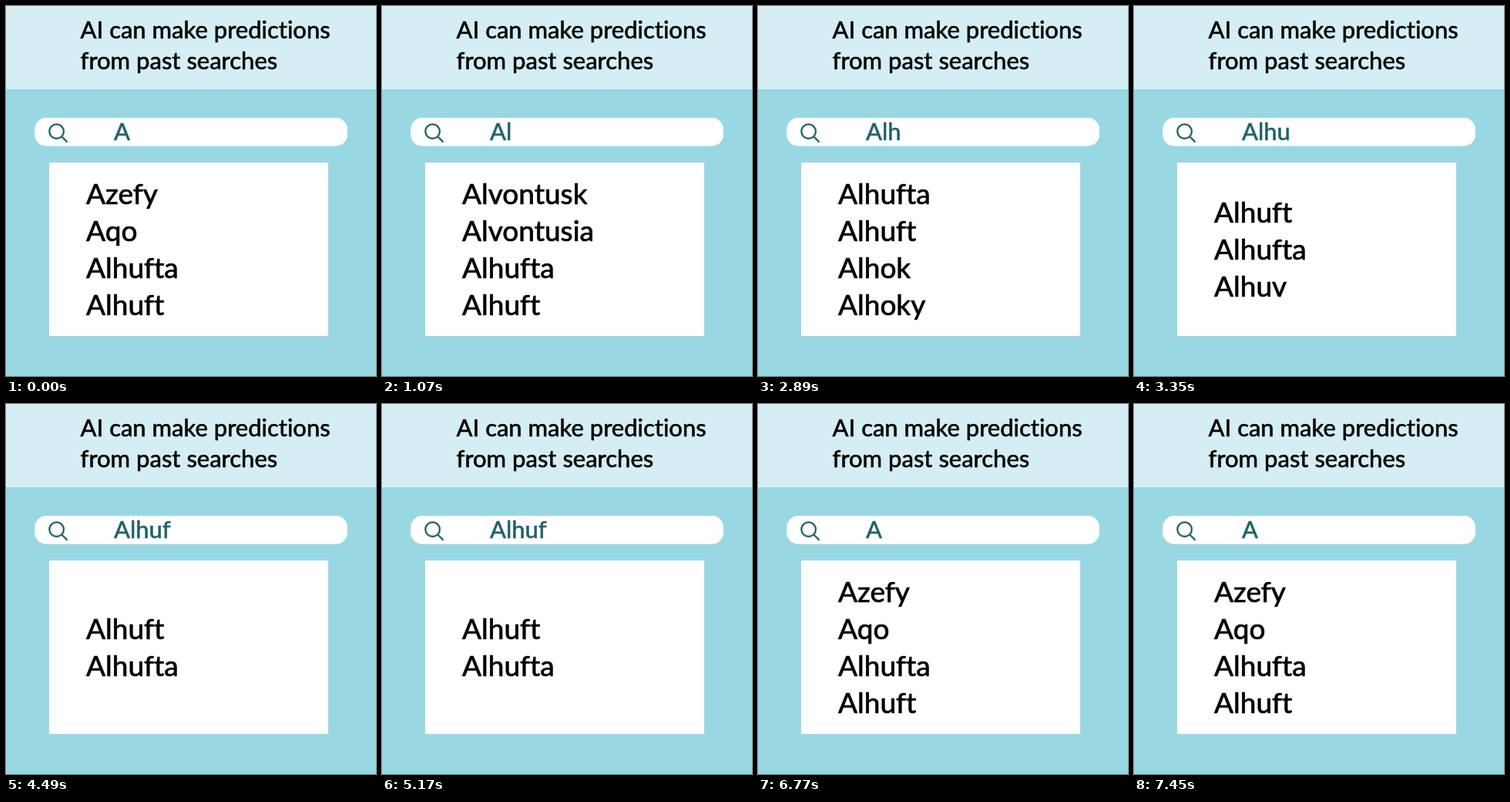
An HTML page with a canvas for the animation above (7.91 s loop, 480 by 480 pixels).

```html
<!DOCTYPE html>
<html lang="en">
<head>
<meta charset="utf-8">
<title>Search predictions</title>
<style>
  html, body { margin: 0; width: 100%; height: 100%; overflow: hidden; }
  canvas { display: block; width: 480px; height: 480px; }
</style>
</head>
<body>
<canvas id="stage" width="480" height="480"></canvas>
<script>
const ctx = document.getElementById('stage').getContext('2d');

const LOOP = 7910, FIRST = 1070, STEP = 1140;
const TEAL = '#1f626c';
const WORD = 'Alhuft';
const SUGGESTIONS = [
  ['Azefy', 'Aqo', 'Alhufta', 'Alhuft'],
  ['Alvontusk', 'Alvontusia', 'Alhufta', 'Alhuft'],
  ['Alhufta', 'Alhuft', 'Alhok', 'Alhoky'],
  ['Alhuft', 'Alhufta', 'Alhuv'],
  ['Alhuft', 'Alhufta'],
  ['Alhuft', 'Alhufta']
];
const POINTER = [[222, 288], [222, 396], [247, 370], [261, 403], [275.5, 396.5], [262, 362], [297, 362]];

// Any letter spacing turns ligatures off.
ctx.letterSpacing = '0.01px';

function rect(color, x, y, w, h) {
  ctx.fillStyle = color;
  ctx.fillRect(x, y, w, h);
}

// A fine outline gives the text a slightly heavier weight than regular.
function text(string, x, baseline, size, color = '#000') {
  ctx.font = `${size}px Lato, sans-serif`;
  ctx.fillStyle = ctx.strokeStyle = color;
  ctx.lineWidth = size * 0.02;
  ctx.lineJoin = 'round';
  ctx.fillText(string, x, baseline);
  ctx.strokeText(string, x, baseline);
}

function drawSearchBar(typed) {
  ctx.fillStyle = '#fff';
  ctx.beginPath();
  ctx.roundRect(37.3, 145, 405.7, 36.7, 15);
  ctx.fill();

  ctx.strokeStyle = TEAL;
  ctx.lineWidth = 2.3;
  ctx.beginPath();
  ctx.arc(65.6, 162.7, 9.3, 0, Math.PI * 2);
  ctx.moveTo(72.2, 169.3);
  ctx.lineTo(79.5, 176.6);
  ctx.stroke();

  text(typed, 140, 174, 31, TEAL);
}

function drawSuggestions(names) {
  rect('#fff', 56, 203, 362, 225);
  names.forEach((name, i) => text(name, 104, 329 + (i - (names.length - 1) / 2) * 48, 37));
}

function drawPointer() {
  ctx.beginPath();
  POINTER.forEach(([x, y]) => ctx.lineTo(x, y));
  ctx.closePath();
  ctx.fillStyle = '#fff';
  ctx.fill();
  ctx.strokeStyle = '#000';
  ctx.lineWidth = 6;
  ctx.lineJoin = 'miter';
  ctx.stroke();
}

function draw(time) {
  const t = time % LOOP;
  const step = t < FIRST ? 0 : (1 + Math.floor((t - FIRST) / STEP)) % WORD.length;

  rect('#98d8e2', 0, 0, 480, 480);
  rect('#d5eef4', 0, 0, 480, 108);
  text('AI can make predictions', 96.5, 42, 31);
  text('from past searches', 96.5, 82, 31);
  drawSearchBar(WORD.slice(0, step + 1));
  drawSuggestions(SUGGESTIONS[step]);
  if (step === WORD.length - 1) drawPointer();
}

function tick() {
  draw(performance.now());
  requestAnimationFrame(tick);
}
tick();
</script>
</body>
</html>
```
